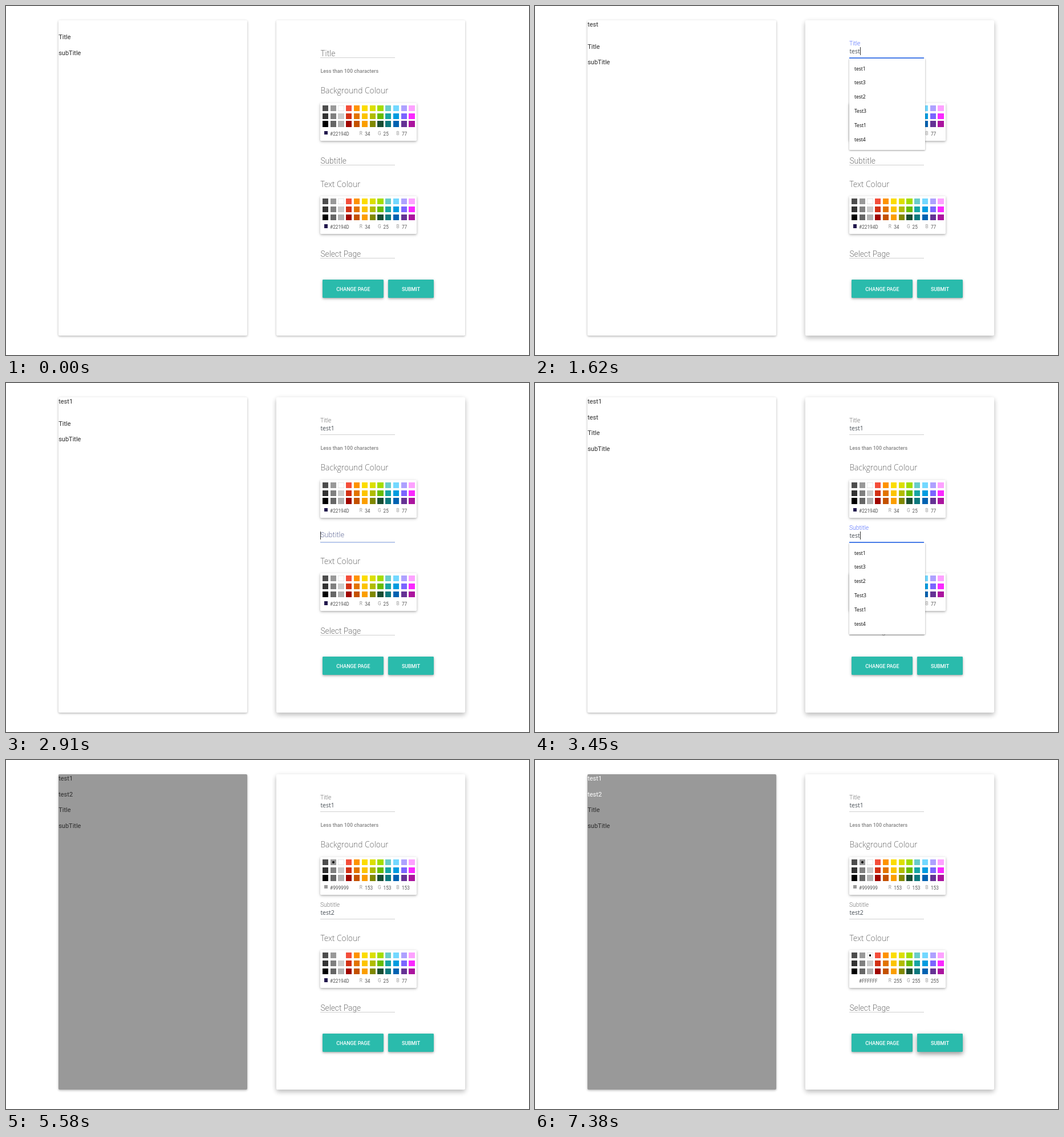
An HTML page that plays this animation: 917x611 px, repeating every 8000 ms.

```html
<!DOCTYPE html>
<html lang="en">
<head>
<meta charset="utf-8">
<title>Page editor</title>
<style>
html, body { margin: 0; width: 100%; height: 100%; overflow: hidden; background: #fff; }
#stage { position: relative; width: 917px; height: 611px; overflow: hidden; font-family: Roboto, sans-serif; }
#stage div { position: absolute; box-sizing: border-box; white-space: pre; }
.card { top: 25.3px; width: 330.7px; height: 551.4px; background: #fff; border-radius: 2px; }
#preview { left: 92.2px; display: flex; flex-direction: column; gap: 11px;
  box-shadow: 0 1.4px 3.4px rgba(0,0,0,.2), 0 1px 5px rgba(0,0,0,.12); }
#preview span { font-size: 11px; line-height: 16.5px; color: #2c2c2c; }
#preview span:empty { height: 0; }
#stage .text { line-height: 0; }
.head { font: 300 13.8px "Open Sans", sans-serif; color: #666; }
.help { font-weight: 500; font-size: 9px; color: #858585; }
.label { font-weight: 300; font-size: 13.75px; color: #757575; transform-origin: 0 0; }
.input { font: 10.5px "Open Sans", sans-serif; color: #495057; }
.caret { width: 1px; height: 14px; background: #333; }
.line { left: 551.4px; width: 131px; height: 1px; background: #d0d0d0; }
.focus { left: 551.4px; width: 131px; height: 2px; background: #4a80f0; }
.menu { left: 551px; width: 133px; height: 160px; background: #fff; border-radius: 1px;
  box-shadow: 0 1px 3px rgba(0,0,0,.4); }
.item { left: 9px; font: 8.5px "Open Sans", sans-serif; color: #000; }
.palette { left: 551.4px; width: 168.6px; height: 65.5px; background: #fff; border-radius: 1.4px;
  box-shadow: 0 1.4px 3.4px rgba(0,0,0,.22), 0 1.4px 6.9px rgba(0,0,0,.14); }
.swatch { width: 10.3px; height: 10.3px; }
.dot { width: 3.8px; height: 3.8px; border-radius: 50%; background: #000; }
.chip { left: 6.6px; top: 49px; width: 6.2px; height: 6.2px; }
.val { font-size: 8.25px; color: #555; }
.key { font-size: 8.25px; color: #999; }
.button { top: 479.4px; height: 31.8px; border-radius: 1.4px; background: #2abbac; overflow: hidden;
  box-shadow: 0 1.4px 3.4px rgba(0,0,0,.24), 0 1.4px 6.9px rgba(0,0,0,.14); }
.button.up { box-shadow: 0 3.4px 7.6px rgba(0,0,0,.3), 0 2.8px 10.3px rgba(0,0,0,.16); }
.button .text { left: 0; right: 0; top: 16.3px; text-align: center; color: #fff; font-weight: 500; font-size: 8.85px; }
#ripple { left: 35px; top: 16px; width: 0; height: 0; border-radius: 50%; background: #000; }
</style>
</head>
<body>
<div id="stage">
  <div class="card" id="preview"><span></span><span></span><span>Title</span><span>subTitle</span></div>
  <div class="card" id="form" style="left:474.3px"></div>
</div>
<script>
const LOOP = 8000;
const stage = document.getElementById('stage');
const form = document.getElementById('form');
const preview = document.getElementById('preview');
const lines = preview.children;

const COLORS = (
  '4D4D4D 999999 FFFFFF F44E3B FE9200 FCDC00 DBDF00 A4DD00 68CCCA 73D8FF AEA1FF FDA1FF ' +
  '333333 808080 CCCCCC D33115 E27300 FCC400 B0BC00 68BC00 16A5A5 009CE0 7B64FF FA28FF ' +
  '000000 666666 B3B3B3 9F0500 C45100 FB9E00 808900 194D33 0C797D 0062B1 653294 AB149E'
).split(' ').map(c => '#' + c);
const OPTIONS = ['test1', 'test3', 'test2', 'Test3', 'Test1', 'test4'];

function add(cls, parent, left, top, text = '') {
  const el = document.createElement('div');
  el.className = cls;
  if (left != null) el.style.left = left + 'px';
  if (top != null) el.style.top = top + 'px';
  el.textContent = text;
  parent.append(el);
  return el;
}
// Text is placed by the middle of its line.
const write = (cls, x, y, text, parent = stage) => add('text ' + cls, parent, x, y, text);
const show = (el, on) => { el.style.visibility = on ? 'visible' : 'hidden'; };
const ramp = (t, a, b) => Math.min(1, Math.max(0, (t - a) / (b - a)));
const easeOut = p => 1 - (1 - p) ** 2;
const mix = (a, b, p) => 'rgb(' + a.map((v, i) => Math.round(v + (b[i] - v) * p)) + ')';

function makePalette(top) {
  const box = add('palette', stage, null, top);
  const swatches = COLORS.map((color, i) => {
    const el = add('swatch', box, 3.5 + i % 12 * 13.77, 3.6 + Math.floor(i / 12) * 13.77);
    el.style.background = color;
    return el;
  });
  const dot = add('dot', box);
  const chip = add('chip', box);
  const hex = write('val', 16.7, 54, '', box);
  const rgb = ['R', 'G', 'B'].map((key, i) => {
    write('key', 68.3 + i * 32.4, 52.7, key, box);
    return write('val', 77.8 + i * 32.4, 54, '', box);
  });
  return (color, active, focused) => {
    hex.textContent = chip.style.background = color;
    rgb.forEach((el, i) => { el.textContent = parseInt(color.substr(1 + i * 2, 2), 16); });
    swatches.forEach((el, i) => {
      el.style.boxShadow = i === focused ? '0 0 2.8px ' + COLORS[i]
        : COLORS[i] === '#FFFFFF' ? 'inset 0 0 0 .7px #ddd' : 'none';
    });
    show(dot, active >= 0);
    if (active >= 0) {
      dot.style.left = 6.75 + active * 13.77 + 'px';
      dot.style.top = '6.85px';
    }
  };
}

function makeField(y, name) {
  add('line', stage, null, y);
  const focus = add('focus', stage, null, y);
  const label = write('label', 551.4, y - 7.2, name);
  const input = write('input', 551.4, y - 11.3, '');
  const caret = add('caret', stage, null, y - 18.5);
  const menu = add('menu', stage, null, y + 2);
  OPTIONS.forEach((text, i) => write('item', null, 17.6 + i * 24.8, text, menu));
  menu.style.zIndex = 2;
  return (t, k) => {
    const lift = easeOut(ramp(t, k.lift, k.lift + 190));
    const lit = easeOut(ramp(t, k.lift, k.lift + 190)) * (1 - easeOut(ramp(t, k.blur, k.blurEnd)));
    label.style.transform = `translateY(${-17.8 * lift}px) scale(${1 - .25 * lift})`;
    label.style.color = mix([117, 117, 117], [83, 109, 254], lit);
    focus.style.opacity = lit;
    const typed = k.keys.filter(at => t >= at).length;
    const text = t >= k.pick ? k.value : 'test'.slice(0, typed);
    input.textContent = text;
    caret.style.left = 551.2 + input.getBoundingClientRect().width + 'px';
    show(caret, t >= k.focus && t < k.blur && !(t >= k.pick + 510));
    show(menu, t >= k.open && t < k.pick);
    return text;
  };
}

const title = makeField(90, 'Title');
write('help', 551.4, 114, 'Less than 100 characters');
write('head', 551.4, 148.3, 'Background Colour').style.lineHeight = 0;
const backPalette = makePalette(170.2);
const subtitle = makeField(278, 'Subtitle');
write('head', 551.4, 311.6, 'Text Colour');
const textPalette = makePalette(333.4);
add('line', stage, null, 441);
write('label', 551.4, 434, 'Select Page');

function makeButton(left, width, text) {
  const el = add('button', stage, left);
  el.style.width = width + 'px';
  return el;
}
const change = makeButton(555.4, 106.8);
write('', null, null, 'CHANGE PAGE', change);
const submit = makeButton(670.4, 79.2);
const ripple = add('', submit);
ripple.id = 'ripple';
write('', null, null, 'SUBMIT', submit);

const TITLE = { focus: 840, lift: 840, open: 1020, keys: [1320, 1410, 1530, 1620],
  pick: 1890, value: 'test1', blur: 2100, blurEnd: 2370 };
const SUBTITLE = { focus: 2790, lift: 2880, open: 3060, keys: [3180, 3270, 3360, 3450],
  pick: 3750, value: 'test2', blur: 4440, blurEnd: 4650 };
const BACK_AT = 4560, TEXT_AT = 5730, SUBMIT_AT = 6600;

function render(t) {
  lines[0].textContent = title(t, TITLE);
  lines[1].textContent = subtitle(t, SUBTITLE);
  lines[0].style.color = lines[1].style.color = t >= TEXT_AT ? '#fff' : '';
  preview.style.background = t >= BACK_AT ? '#999' : '#fff';

  const raise = t < 360 ? 0 : 1 - .6 * Math.sin(Math.PI * ramp(t, 2100, 2370));
  form.style.boxShadow = `0 ${1.4 + 3 * raise}px ${3.4 + 4.6 * raise}px rgba(0,0,0,.19), ` +
    `0 ${1 + raise}px ${5 + 5 * raise}px rgba(0,0,0,.11)`;

  const backSet = t >= BACK_AT, textSet = t >= TEXT_AT;
  backPalette(backSet ? '#999999' : '#22194D', backSet ? 1 : -1, t >= 4440 && t < 5580 ? 1 : -1);
  textPalette(textSet ? '#FFFFFF' : '#22194D', textSet ? 2 : -1, t >= 5580 && t < SUBMIT_AT ? 2 : -1);

  submit.className = t >= SUBMIT_AT ? 'button up' : 'button';
  const size = 110 * ramp(t, SUBMIT_AT, SUBMIT_AT + 210);
  ripple.style.width = ripple.style.height = size + 'px';
  ripple.style.margin = -size / 2 + 'px';
  ripple.style.opacity = .25 * (1 - ramp(t, 6840, 7380));
}

const start = performance.now();
function tick() {
  render((performance.now() - start) % LOOP);
  requestAnimationFrame(tick);
}
tick();
</script>
</body>
</html>
```
